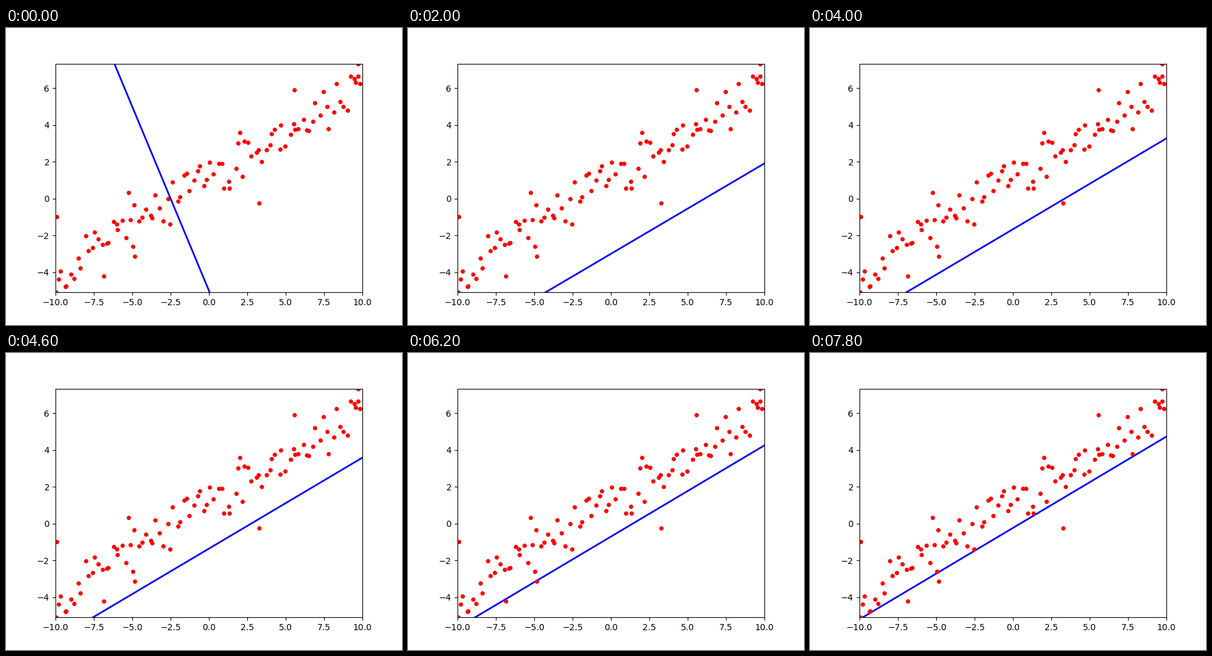
Recreate the animation shown at these times as a matplotlib script. Size 640 by 480 pixels, loop 8 s.

```python
import numpy as np
import matplotlib.pyplot as plt
from matplotlib.animation import FuncAnimation

W, H, DPI = 640, 480, 100
FRAMES, INTERVAL = 40, 200

DOTS = 100
SLOPE, OFFSET = 0.4985, 0.985     # best fit of the dots
MEAN_X, MEAN_XX = -0.06, 32.0     # moments that shape the descent
RATE = 0.04
START = (-2.0, -5.0)              # first slope and intercept

# Dots that stand out at the edges of the cloud
OUTLIERS = np.array([
    (-9.95, -5.09), (9.7, 7.33), (9.7, 6.65), (-9.9, -1.0), (3.28, -0.25),
    (2.0, 3.57), (-5.25, 0.34), (-4.82, -3.15), (5.58, 5.9), (-6.85, -4.22),
])


def make_dots():
    """Evenly spread, jittered dots around the best fit, plus the outliers."""
    rng = np.random.default_rng(4)
    n = DOTS - len(OUTLIERS)
    x = (np.arange(n) + rng.random(n)) / n * 20 - 10
    noise = np.clip(rng.normal(0, 0.8, n), -1.1, 1.1)
    cloud = np.column_stack([x, SLOPE * x + OFFSET + noise])
    return np.vstack([cloud, OUTLIERS])


def descend(steps):
    """Slope and intercept at each step of gradient descent."""
    w, b = START
    path = []
    for _ in range(steps):
        path.append((w, b))
        dw, db = w - SLOPE, b - OFFSET
        w -= RATE * (dw * MEAN_XX + db * MEAN_X)
        b -= RATE * (dw * MEAN_X + db)
    return path


fig, ax = plt.subplots(figsize=(W / DPI, H / DPI), dpi=DPI)
ax.set_xlim(-10, 10)
ax.set_ylim(OUTLIERS[:, 1].min(), OUTLIERS[:, 1].max())

path = descend(FRAMES)
ends = np.array([-10.0, 10.0])
line, = ax.plot(ends, START[0] * ends + START[1], "b-", lw=2)
ax.plot(*make_dots().T, "ro", markersize=4)


def update(i):
    w, b = path[i]
    line.set_ydata(w * ends + b)
    return line,


anim = FuncAnimation(fig, update, frames=FRAMES, interval=INTERVAL,
                     repeat=True, repeat_delay=0)
plt.show()
```
